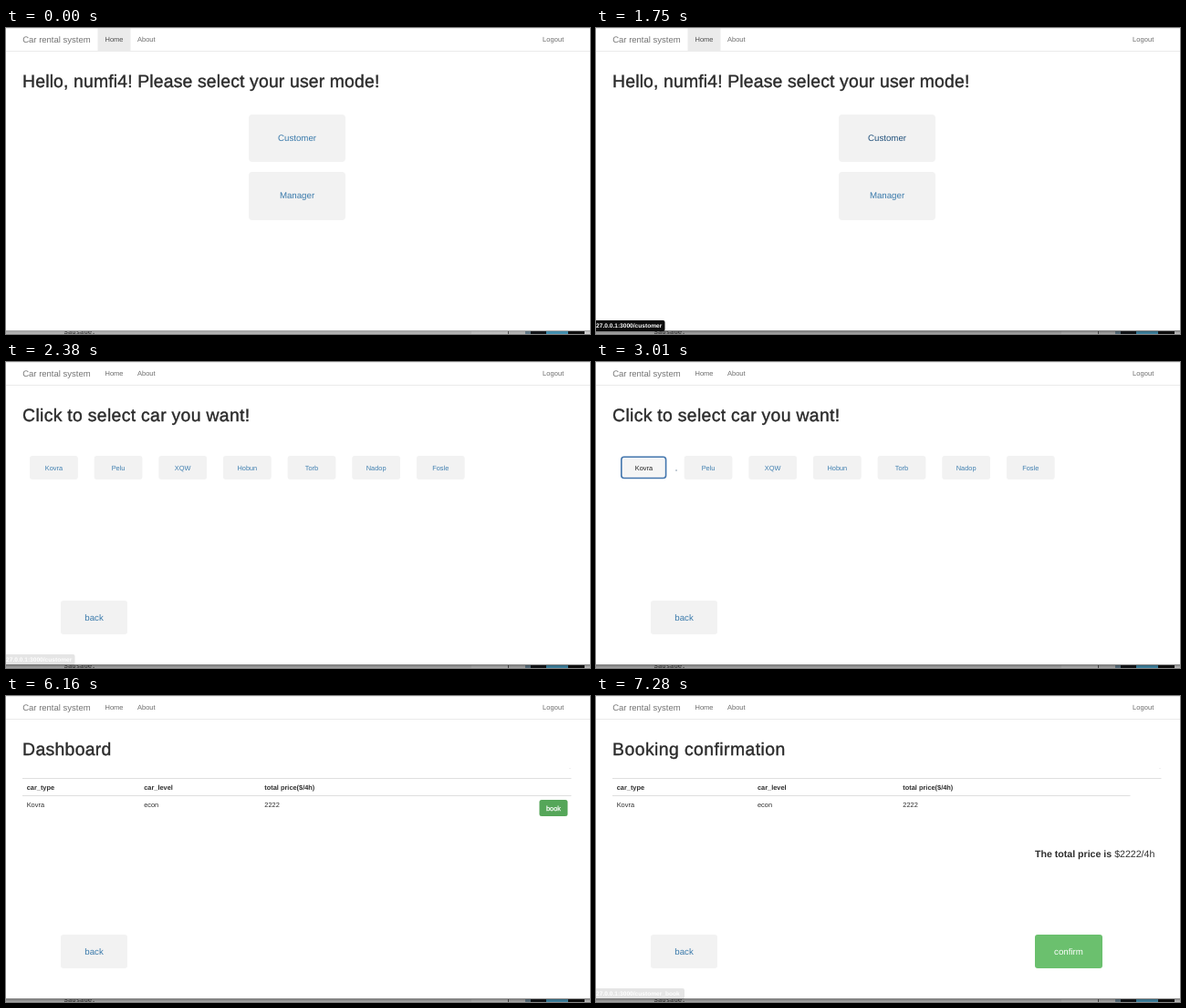
Recreate the animation shown at these times as an HTML page. Size 640 by 336 pixels, loop 8000 ms.

```html
<!DOCTYPE html>
<html lang="en">
<head>
<meta charset="utf-8">
<title>Car rental system</title>
<style>
html, body { margin: 0; width: 100%; height: 100%; overflow: hidden; background: #fff; }
svg { display: block; width: 640px; height: 336px; font-family: "Liberation Sans", Arial, sans-serif; }
text { text-rendering: geometricPrecision; }
.mid { text-anchor: middle; }
.bold { font-weight: 700; }
.h1 { font-size: 19.4px; fill: #2b2b2b; stroke: #2b2b2b; stroke-width: .4px; }
.brand { font-size: 9.5px; fill: #747474; }
.nav { font-size: 7.5px; fill: #6c6c6c; }
.cell { font-size: 7.4px; fill: #2e2e2e; }
.total { font-size: 10.6px; fill: #2e2e2e; }
.small { font-size: 7.4px; fill: #3f7fb0; }
.big { font-size: 9.7px; fill: #3a7aab; }
.white { fill: #fff; }
.heavy { stroke: #fff; stroke-width: .25px; }
.mono { font: 7.3px "Liberation Mono", monospace; fill: #222; }
.status { font-size: 6.6px; font-weight: 700; fill: #fff; }
.line { stroke: #dfdfdf; stroke-width: 1; }
</style>
</head>
<body>
<svg id="stage" viewBox="0 0 640 336" width="640" height="336">
  <defs>
    <linearGradient id="shade" x1="0" y1="0" x2="0" y2="1">
      <stop offset="0" stop-color="#000" stop-opacity=".45"/>
      <stop offset="1" stop-color="#000" stop-opacity=".15"/>
    </linearGradient>
  </defs>
</svg>
<script>
const stage = document.getElementById('stage');
const LOOP = 8000, GRAY = '#f2f2f2', GREEN = '#6bc06e';

function add(parent, tag, attrs, text) {
  const el = document.createElementNS('http://www.w3.org/2000/svg', tag);
  for (const k in attrs) el.setAttribute(k, attrs[k]);
  if (text) el.textContent = text;
  parent.appendChild(el);
  return el;
}
const group = () => add(stage, 'g', {});
const rect = (g, x, y, width, height, fill, rx = 0) =>
  add(g, 'rect', { x, y, width, height, fill, rx });
const label = (g, x, y, text, cls, more) =>
  add(g, 'text', { x, y, class: cls, ...more }, text);
const line = (g, x1, x2, y) => add(g, 'line', { x1, x2, y1: y, y2: y, class: 'line' });
const show = (el, on) => el.setAttribute('display', on ? 'inline' : 'none');
const title = (g, text, gap) => label(g, 18.1, 65.4, text, 'h1', { 'letter-spacing': gap });

function button(g, x, y, w, h, text, cls, base, fill = GRAY, rx = 3) {
  return {
    box: rect(g, x, y, w, h, fill, rx),
    text: label(g, x + w / 2, base, text, 'mid ' + cls)
  };
}
const backButton = g => button(g, 60, 262, 73, 37, 'back', 'big', 284);

// Window behind the browser
const desk = group();
rect(desk, 0, 330, 640, 6, '#c6c6c6');
rect(desk, 510, 330, 40, 6, '#d2d2d2');
rect(desk, 550, 330, 1, 6, '#555');
rect(desk, 569, 330, 6, 6, '#6d8797');
rect(desk, 575, 330, 17, 6, '#15181c');
rect(desk, 592, 330, 24, 6, '#4ba0c4');
rect(desk, 616, 330, 18, 6, '#111');
rect(desk, 634, 330, 6, 6, '#e4e4e4');
label(desk, 63.5, 335.5, 'Sausage,', 'mono');
const shade = rect(desk, 0, 332, 640, 4, 'url(#shade)');
const edge = rect(desk, 0, 332, 640, 1, '#a8a8a8');

// Browser window and navigation bar
const win = group();
rect(win, 0, 0, 640, 332, '#fff');
const active = rect(win, 100.5, 0, 36, 25, '#ebebeb');
rect(win, 0, 25, 640, 1, '#ebebeb');
rect(win, 0, 0, 640, .4, '#d4d4d4');
label(win, 18.2, 16, 'Car rental system', 'brand');
const home = label(win, 108.5, 15.4, 'Home', 'nav');
label(win, 144, 15.4, 'About', 'nav');
label(win, 588, 15.4, 'Logout', 'nav', { 'letter-spacing': .1 });

// Mode choice
const modes = group();
title(modes, 'Hello, numfi4! Please select your user mode!', .15);
const customer = button(modes, 266, 95, 106, 52, 'Customer', 'big', 124.3, GRAY, 4);
button(modes, 266, 158, 106, 53, 'Manager', 'big', 187.2, GRAY, 4);

// Car choice
const cars = group();
title(cars, 'Click to select car you want!', .31);
const [first] = ['Kovra', 'Pelu', 'XQW', 'Hobun', 'Torb', 'Nadop', 'Fosle'].map((name, i) =>
  button(cars, 26 + i * 70.65, 103, 52.8, 26, name, 'small', 118.6));
const gap = rect(cars, 87, 118.5, 2, 1, '#8b9db0');
backButton(cars);

// Tables
function table(g, cols, end) {
  line(g, 18, 619.5, 90.5);
  line(g, 18, end, 109.5);
  rect(g, 617, 79, 2, .6, '#e8e8e8');
  ['car_type', 'car_level', 'total price($/4h)'].forEach((t, i) =>
    label(g, cols[i], 102.8, t, 'cell bold'));
  ['Kovra', 'econ', '2222'].forEach((t, i) => label(g, cols[i], 122.3, t, 'cell'));
  backButton(g);
}

const dash = group();
title(dash, 'Dashboard', .3);
table(dash, [22.7, 151.2, 283.3], 619.5);
const book = button(dash, 584.5, 114, 31, 18, 'book', 'small white heavy', 125.8, GREEN, 2.5);

const confirm = group();
title(confirm, 'Booking confirmation', .43);
table(confirm, [22.7, 177, 336.3], 585.5);
const total = label(confirm, 481, 176.6, '', 'total');
add(total, 'tspan', { class: 'bold' }, 'The total price is');
add(total, 'tspan', {}, ' $2222/4h');
button(confirm, 481, 262, 74, 37, 'confirm', 'big white', 284, GREEN);

// Address hints at the lower left
function hint(width, path) {
  const g = group();
  rect(g, -4, 321, width + 4, 12, '#0b0b0b', 2);
  label(g, -3.6, 329.3, '127.0.0.1:3000/' + path, 'status');
  return g;
}
const hintA = hint(75.5, 'customer'), hintB = hint(97, 'customer_book');

// Hint opacity: on at start, then a stepped fade from end down to low
function fade(t, start, end, low) {
  if (t < start) return 0;
  if (t < end) return 1;
  const step = Math.floor((t - end) / 70);
  return Math.max(low, .7 - step * .3);
}

function focusBox(box, on) {
  const attrs = on
    ? { x: 27.8, y: 104.3, width: 48.8, height: 23.2, fill: '#f5f5f5', stroke: '#4376ae' }
    : { x: 26, y: 103, width: 52.8, height: 26, fill: GRAY, stroke: 'none' };
  for (const k in attrs) box.setAttribute(k, attrs[k]);
}
first.box.setAttribute('stroke-width', 1.6);

function draw(t) {
  const page = t < 1890 ? 0 : t < 3220 ? 1 : t < 6790 ? 2 : 3;
  [modes, cars, dash, confirm].forEach((g, i) => show(g, i === page));
  show(active, page === 0);
  home.style.fill = page === 0 ? '#4f4f4f' : '';

  const settled = t >= 1050;
  shade.setAttribute('opacity', settled ? 1 : .45);
  edge.setAttribute('fill', settled ? '#858585' : '#a8a8a8');

  customer.text.style.fill = t >= 1470 ? '#23527c' : '';

  const over = t >= 2730;
  first.text.style.fill = over ? '#222' : '';
  show(gap, over);
  focusBox(first.box, t >= 3010);

  book.box.setAttribute('fill', t < 6160 ? GREEN : t < 6510 ? '#55a659' : '#4a924d');

  hintA.setAttribute('opacity', fade(t, 1750, 2240, 0));
  hintB.setAttribute('opacity', fade(t, 6510, 7140, .07));
}

function tick() {
  draw(performance.now() % LOOP);
  requestAnimationFrame(tick);
}
draw(0);
requestAnimationFrame(tick);
</script>
</body>
</html>
```
